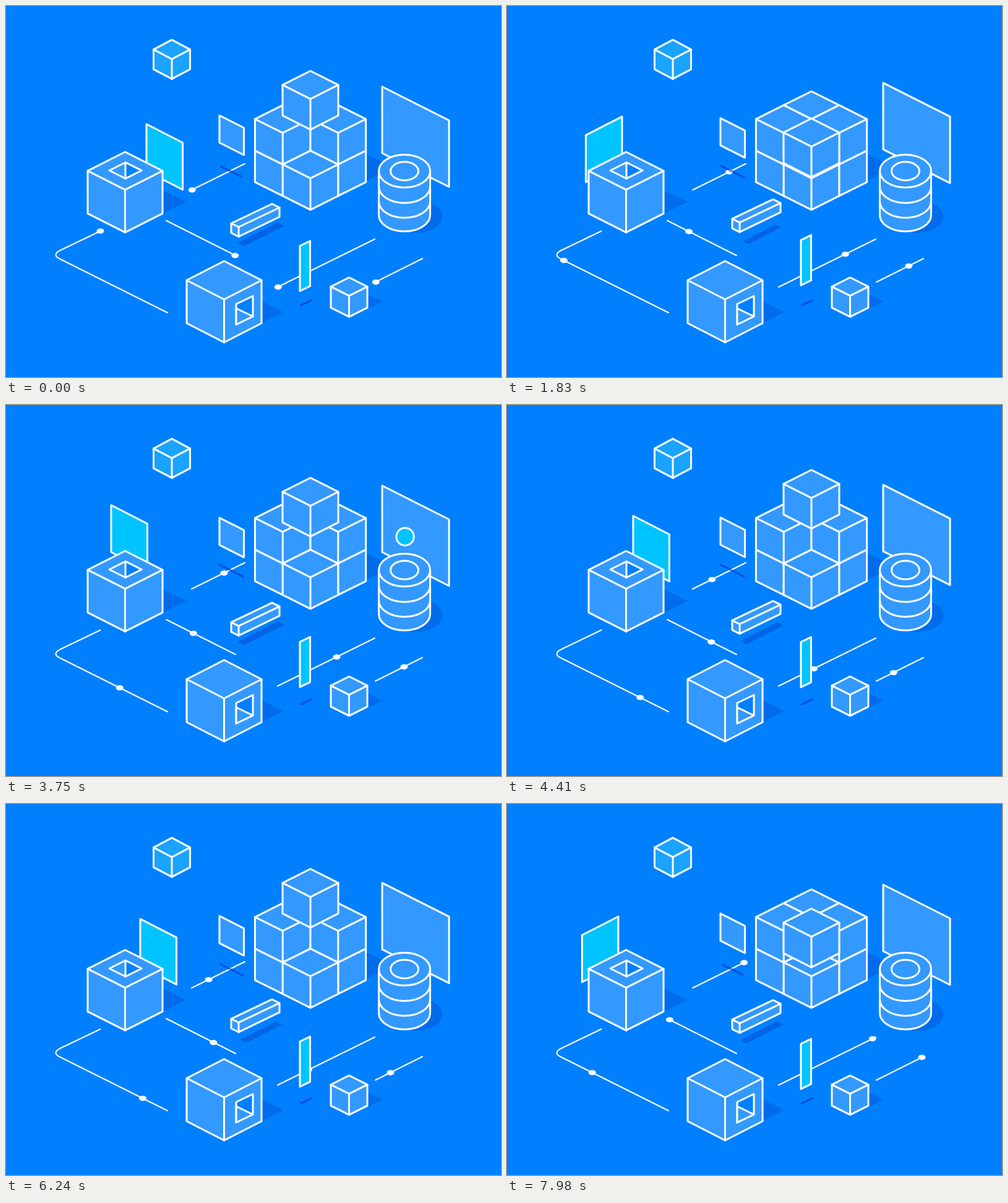
These frames come from a looping animation (800x600 px, 8 s). An HTML page with a canvas:

```html
<!DOCTYPE html>
<html lang="en">
<head>
<meta charset="utf-8">
<title>Isometric blocks</title>
<style>
  html, body { margin: 0; width: 100%; height: 100%; overflow: hidden; background: #0080ff; }
  canvas { display: block; }
</style>
</head>
<body>
<canvas id="stage" width="800" height="600"></canvas>
<script>
const ctx = document.getElementById('stage').getContext('2d');
const LOOP = 8000, STEP = 30;
const BG = '#0080ff', FACE = '#3399ff', CYAN = '#00c4ff', SKY = '#1aa3ff', SHADE = '#006ceb';
const DEEP = 'rgba(0,50,200,.6)';

const clamp = (v, lo = 0, hi = 1) => Math.min(hi, Math.max(lo, v));
const mix = (a, b, u) => a + (b - a) * u;
const ease = u => 0.5 - 0.5 * Math.cos(Math.PI * clamp(u));
const bump = (frame, length) => Math.sin(Math.PI * frame / length) ** 2;

// Travels 0 to 1 and back, resting one frame at each end.
function shuttle(frame, half) {
  const n = frame % (2 * half), run = half - 1;
  return n < half ? n / run : 1 - (n - half) / run;
}

function paint(fill, stroke = '#fff', width = 3) {
  if (fill) { ctx.fillStyle = fill; ctx.fill(); }
  if (stroke) { ctx.strokeStyle = stroke; ctx.lineWidth = width; ctx.stroke(); }
}

function poly(points, fill, stroke) {
  ctx.beginPath();
  points.forEach(([x, y]) => ctx.lineTo(x, y));
  ctx.closePath();
  paint(fill, stroke);
}

function line(x1, y1, x2, y2, width = 3, color = '#fff') {
  ctx.beginPath();
  ctx.moveTo(x1, y1);
  ctx.lineTo(x2, y2);
  paint(null, color, width);
}

function ellipse(x, y, rx, ry, fill, stroke) {
  ctx.beginPath();
  ctx.ellipse(x, y, rx, ry, 0, 0, 2 * Math.PI);
  paint(fill, stroke);
}

// (x, y) is the rear top corner, w and h half the top face, d the wall height.
function cube(x, y, w, h, d, fill = FACE) {
  const left = [x - w, y + h], right = [x + w, y + h], front = [x, y + 2 * h];
  poly([[x, y], right, [x + w, y + h + d], [x, y + 2 * h + d], [x - w, y + h + d], left], fill);
  ctx.beginPath();
  ctx.moveTo(...left);
  ctx.lineTo(...front);
  ctx.lineTo(...right);
  ctx.moveTo(...front);
  ctx.lineTo(x, y + 2 * h + d);
  paint(null);
}

function pane(x1, y1, x2, y2, height, fill) {
  poly([[x1, y1], [x2, y2], [x2, y2 + height], [x1, y1 + height]], fill);
}

function shadow(x, y, w, h) {
  poly([[x, y - h], [x + w, y], [x, y + h]], SHADE, null);
}

const dot = (x, y) => ellipse(x, y, 6, 4.2, '#fff', null);

const tracks = [
  [300, 297.5, 386, 255],
  [371, 403.5, 259, 347],
  [439, 454.5, 596, 377],
  [597, 446.5, 673, 408.5]
];
const bend = 'M152.5 364 L88 395 Q73 402.5 88 409.5 L261 496';
const bendCurve = new Path2D(bend);
const bendRuler = document.createElementNS('http://www.w3.org/2000/svg', 'path');
bendRuler.setAttribute('d', bend);

function drawTracks(frame) {
  const u = shuttle(frame, 90);
  for (const [x1, y1, x2, y2] of tracks) {
    line(x1, y1, x2, y2, 2);
    dot(mix(x1 + Math.sign(x2 - x1) * 0.7, x2, u), mix(y1, y2, u));
  }
  ctx.lineWidth = 2;
  ctx.stroke(bendCurve);
  const p = bendRuler.getPointAtLength(bendRuler.getTotalLength() * shuttle(frame, 180));
  dot(p.x, p.y);
}

// Slides along one wall direction, turns, and continues along the other.
function drawSlidingPane(frame) {
  const n = frame < 201.5 ? frame : frame - 201.5;
  const c = n <= 81 ? n : Math.max(0, 162 - n);
  const rearX = 227 - 1.54 * c, rearY = 191 - 0.784 * c;
  const sideX = 93 + 1.72 * (81 - c), sideY = 221 - 0.517 * (sideX - 104);
  const turn = ease((c - 42) / 8);
  const x = mix(rearX, sideX, turn);
  pane(x, mix(rearY, sideY, turn), x + 58.5, mix(rearY + 30, sideY - 30, turn), 76, CYAN);
}

function drawLeftCube() {
  shadow(253, 317, 39, 19);
  cube(192.5, 236, 60.5, 30.6, 69);
  poly([[167, 266], [193, 253], [219, 266], [193, 279]], FACE);
  poly([[193, 253], [219, 266], [193, 279]], BG);
}

function drawFrontCube() {
  shadow(413, 495, 35, 18);
  cube(352.5, 412.5, 60.5, 31, 69.5);
  poly([[372, 482], [399, 469], [399, 502], [372, 515]], BG);
  poly([[372, 489], [399, 502], [372, 515]], FACE);
}

function drawStack(frame) {
  const w = 44.8, h = 22.4, d = 51;
  const x = 492, y = 138;
  const spots = [[x, y], [x - w, y + h], [x + w, y + h], [x, y + 2 * h]];
  shadow(582, 261, 43, 22);
  spots.forEach(([px, py]) => cube(px, py + d, w, h, d));
  spots.slice(0, 3).forEach(([px, py]) => cube(px, py, w, h, d));
  const drop = frame < 81 ? ease(frame / 60)
    : frame < 222 ? 1 - ease((frame - 81) / 60)
    : ease((frame - 222) / 60);
  cube(x, 105 + 77 * drop, 45, 22.7, 49.5);
}

function drawCylinder(frame) {
  const x = 644, rx = 41.5, ry = 26.5, top = 267;
  ellipse(663, 340.5, 42.5, ry, SHADE, null);
  const lift = frame < 135 ? bump(Math.min(frame, 91), 91) : bump(Math.min(frame - 135, 91), 91);
  const paneY = 130.5 - 8.3 * lift;
  pane(608, paneY, 716, paneY + 54.5, 107.5, FACE);

  ctx.beginPath();
  ctx.ellipse(x, 338, rx, ry, 0, 0, Math.PI);
  ctx.lineTo(x - rx, top);
  ctx.ellipse(x, top, rx, ry, 0, Math.PI, 2 * Math.PI);
  ctx.closePath();
  paint(FACE);
  for (const y of [top, 292, 316]) {
    ctx.beginPath();
    ctx.ellipse(x, y, rx, ry, 0, 0, Math.PI);
    paint(null);
  }
  ellipse(x, top, 22.5, 15, FACE);

  if (frame > 105 && frame < 145) {
    ctx.save();
    ctx.beginPath();
    ctx.rect(x - 22.5, 0, 45, top);
    ctx.ellipse(x, top, 22.5, 15, 0, 0, Math.PI);
    ctx.clip();
    ellipse(645, 300 - 87 * bump(frame - 105, 40), 14.2, 14.2, CYAN);
    ctx.restore();
  }
}

function drawSmallPane(frame) {
  const sink = 6 * bump(frame, 90);
  const reach = 1 + 0.035 * sink;
  line(364.5 - 16 * reach, 268 - 8 * reach, 364.5 + 16 * reach, 268 + 8 * reach, 3.2, DEEP);
  pane(345, 177 + sink, 384.5, 197 + sink, 44, FACE);
}

function drawThinPane(frame) {
  const rise = (frame < 90 ? 13 : 5.6) * bump(frame, 90);
  const reach = 1 - 0.01 * rise;
  line(485 - 8.5 * reach, 480 + 4 * reach, 485 + 8.5 * reach, 480 - 4 * reach, 3.5, DEEP);
  pane(475, 388 - rise, 491.5, 380 - rise, 73, CYAN);
}

function drawBar(frame) {
  const rise = 7.3 * bump(frame, 120);
  const k = 1 - 0.025 * rise;
  const shade = [[-38, 14], [-27, 19.5], [38, -13.5], [27, -19]];
  poly(shade.map(([x, y]) => [412 + x * k, 369 + y * k]), '#0064e6', null);
  ctx.save();
  ctx.translate(0, -rise);
  poly([[364, 351.5], [430, 320], [442, 326], [442, 341], [376, 373], [364, 367]], FACE);
  line(364, 351.5, 376, 357.5);
  line(376, 357.5, 442, 326);
  line(376, 357.5, 376, 373);
  ctx.restore();
}

function draw(now) {
  const frame = Math.floor(now % LOOP / STEP);
  ctx.fillStyle = BG;
  ctx.fillRect(0, 0, 800, 600);
  ctx.lineJoin = ctx.lineCap = 'round';
  drawTracks(frame);
  cube(268, 54.7, 29.5, 15.6, 32, SKY);
  drawSlidingPane(frame);
  drawLeftCube();
  drawSmallPane(frame);
  drawStack(frame);
  drawCylinder(frame);
  drawBar(frame);
  drawFrontCube();
  drawThinPane(frame);
  shadow(584, 478, 25, 12);
  cube(554.5, 439, 29.5, 14.8, 34);
}

const start = performance.now();
function tick() {
  draw(performance.now() - start);
  requestAnimationFrame(tick);
}
tick();
</script>
</body>
</html>
```
